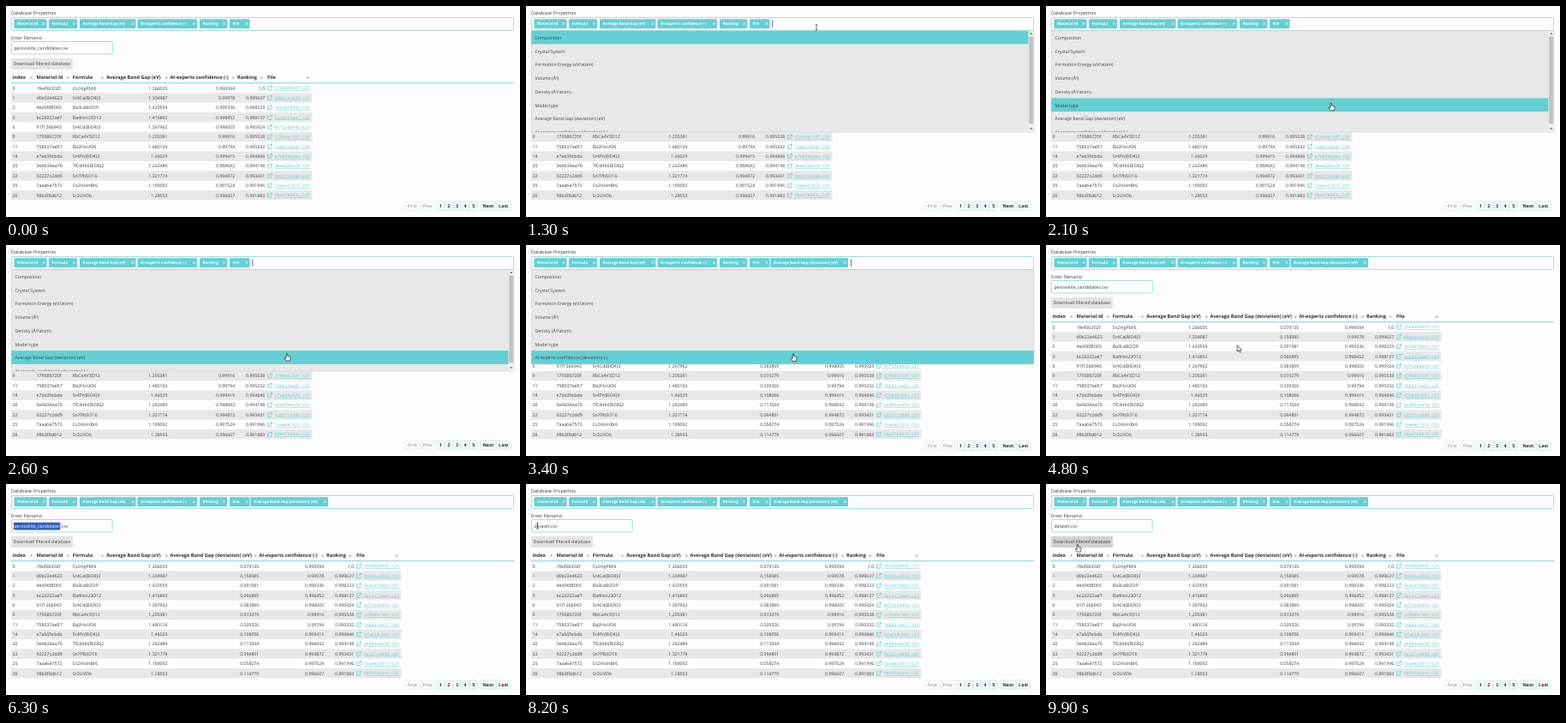
Write an HTML page with a canvas that moves like this. It is 600x246 px and loops after 10 s.

```html
<!DOCTYPE html>
<html lang="en">
<head>
<meta charset="utf-8">
<title>Candidate database</title>
<style>
html, body { margin: 0; width: 100%; height: 100%; overflow: hidden; background: #fefdfe; }
canvas { display: block; width: 600px; height: 246px; }
</style>
</head>
<body>
<canvas id="stage"></canvas>
<script>
const W = 600, H = 246, LOOP = 10000;
const PAPER = '#fefdfe', TEAL = '#62d0d4', EDGE = '#a5dde0', INK = '#404040', GRAY = '#e9e8e9';
const SANS = '"Open Sans", "Noto Sans", sans-serif';
const MONO = '"Liberation Mono", "DejaVu Sans Mono", monospace';

const canvas = document.getElementById('stage');
const ctx = canvas.getContext('2d');
const dpr = window.devicePixelRatio || 1;
canvas.width = W * dpr;
canvas.height = H * dpr;

// index, id, formula, gap, gap deviation, confidence, ranking
const rows = `0 1fe45b302f Cs2HgPbF6 1.266035 0.079135 0.999594 1.0
1 d0e22e4623 Sr4Ca(BiO4)3 1.334987 0.158985 0.99978 0.999637
2 4ed36f8003 Ba3LaBi2O9 1.420559 0.091081 0.999336 0.998223
3 bc2d222ae7 Ba4HoU3O12 1.416893 0.066895 0.998452 0.998137
6 91f126b943 Sr4Cd(BiO4)3 1.267962 0.083859 0.998005 0.995924
9 179586720f RbCa4V3O12 1.205381 0.073279 0.99916 0.995538
11 758537ee57 Ba2HoUO6 1.480124 0.039326 0.99794 0.995332
14 e7ab39cbda Sr4Pr(BiO4)3 1.46029 0.108056 0.999415 0.994846
20 0e4b34ea76 TlCd4In(BiO6)2 1.242489 0.113954 0.998692 0.994198
22 92227c2dd9 Sn7PbSO16 1.321774 0.094851 0.994872 0.993431
25 7aaa6e7572 Cs2HoInBr6 1.189092 0.058274 0.997524 0.991996
26 98b3f8d612 Sr2UVO6 1.28553 0.114779 0.996607 0.991883`
  .split('\n').map(line => line.split(' '));

const GAP = 'Average Band Gap (eV)', GAP_DEV = 'Average Band Gap (deviation) (eV)';
const CONF = 'AI-experts confidence (-)', CONF_DEV = 'AI-experts confidence (deviation) (-)';

// label, left, right
const chips = [
  ['Material Id', 9.5, 47.5], ['Formula', 50, 83], [GAP, 86, 151.5],
  [CONF, 153.5, 223], ['Ranking', 226, 258], ['File', 261, 284.5], [GAP_DEV, 285.5, 376]
];
const options = ['Composition', 'Crystal System', 'Formation Energy (eV/atom)', 'Volume (Å³)',
  'Density (Å³/atom)', 'Model type', GAP_DEV, CONF_DEV];

// Pointer hot spot: time, x, y
const path = [
  [300, 334, -12], [900, 339, 25], [1400, 339, 25], [2300, 332, 126], [2600, 328, 126.5],
  [3400, 312, 127], [4200, 294, 124], [4400, 292, 146], [5500, 63, 49], [5700, 63, 49],
  [6250, 9.5, 49], [7800, 9.5, 49], [8150, 13.5, 49], [8700, 13.5, 49], [9500, 37, 70.5]
];
const OPEN = 1200, PICK = 3400, CLOSE = 4400, DRAG = 5700, TYPE = 6900, KEY = 110;
const LIST_Y = 28.7, ITEM_H = 15.75, ROW_Y = 90, ROW_H = 11.36;

function rect(x, y, w, h, color) {
  ctx.fillStyle = color;
  ctx.fillRect(x, y, w, h);
}

function box(x, y, w, h, r, fill, stroke, line = 1) {
  ctx.beginPath();
  ctx.roundRect(x, y, w, h, r);
  if (fill) { ctx.fillStyle = fill; ctx.fill(); }
  if (stroke) { ctx.strokeStyle = stroke; ctx.lineWidth = line; ctx.stroke(); }
}

function text(s, x, mid, size = 5.25, color = INK, o = {}) {
  ctx.font = `${o.bold ? 'bold ' : ''}${size}px ${o.mono ? MONO : SANS}`;
  ctx.textAlign = o.align || 'left';
  ctx.fillStyle = color;
  ctx.fillText(s, x, mid + size * 0.36);
}

function width(s, size) {
  ctx.font = `${size}px ${SANS}`;
  return ctx.measureText(s).width;
}

function pointer(t) {
  if (t < path[0][0]) return { x: path[0][1], y: path[0][2] };
  for (let i = 1; i < path.length; i++) {
    const [t0, x0, y0] = path[i - 1], [t1, x1, y1] = path[i];
    if (t < t1) {
      const u = (t - t0) / (t1 - t0), e = u * u * (3 - 2 * u);
      return { x: x0 + (x1 - x0) * e, y: y0 + (y1 - y0) * e };
    }
  }
  const last = path[path.length - 1];
  return { x: last[1], y: last[2] };
}

const blink = (t, start) => t >= start && (t - start) % 1060 < 530;

function cross(x, y, r) {
  ctx.strokeStyle = '#fff';
  ctx.lineWidth = 0.8;
  ctx.beginPath();
  ctx.moveTo(x - r, y - r);
  ctx.lineTo(x + r, y + r);
  ctx.moveTo(x + r, y - r);
  ctx.lineTo(x - r, y + r);
  ctx.stroke();
}

function drawSelect(t) {
  text('Database Properties', 6, 8, 5.5);
  box(6.5, 13.5, 586, 15, 1, PAPER, EDGE);
  const shown = chips.slice(0, t < PICK ? 6 : 7);
  for (const [label, l, r] of shown) {
    box(l, 15.3, r - l, 11, 1, TEAL);
    text(label, l + 3.6, 20.7, 4.45, '#fff', { bold: true });
    cross(r - 3.5, 20.6, 1.2);
  }
  if (t < CLOSE && blink(t, OPEN)) rect(shown[shown.length - 1][2] + 3, 16.5, 0.7, 8.5, '#333');
}

function drawForm(t, p) {
  text('Enter filename', 6, 37, 5.3);
  box(6.5, 41.5, 117.7, 14.5, 1, PAPER, EDGE);
  const size = 5.25, left = 9.4, stem = 'perovskite_candidates', word = 'dataset';
  const typed = Math.floor((t - TYPE) / KEY) + 1;
  const name = t < TYPE ? stem : word.slice(0, typed);
  text(name + '.csv', left, 49, size);

  const end = left + width(name, size);
  if (t >= DRAG && t < TYPE) {
    const from = Math.max(left, Math.min(p.x, end));
    ctx.save();
    ctx.beginPath();
    ctx.rect(from, 44.6, end - from, 9.2);
    ctx.clip();
    rect(from, 44.6, end - from, 9.2, '#2f63c0');
    text(name, left, 49, size, '#fff');
    ctx.restore();
  }
  const typing = t >= TYPE && t < TYPE + KEY * word.length;
  if (t < 9400 && (typing || blink(t, TYPE + KEY * word.length))) rect(end, 45, 0.6, 8, '#333');

  const hover = p.x > 6 && p.x < 78 && p.y > 61 && p.y < 74;
  box(6, 61, 72, 13, 1.5, hover ? '#d0d0d0' : '#e4e3e4');
  text('Download filtered database', 8.5, 67.4, 5.2);
}

function sortArrow(x) {
  ctx.fillStyle = '#b5b5b5';
  ctx.beginPath();
  ctx.moveTo(x - 2, 84.6);
  ctx.lineTo(x, 82);
  ctx.lineTo(x + 2, 84.6);
  ctx.fill();
}

function linkIcon(x, y) {
  ctx.strokeStyle = TEAL;
  ctx.lineWidth = 0.8;
  ctx.beginPath();
  ctx.moveTo(x + 2.6, y - 1.8);
  ctx.lineTo(x + 0.5, y - 1.8);
  ctx.lineTo(x + 0.5, y + 2.5);
  ctx.lineTo(x + 4.6, y + 2.5);
  ctx.lineTo(x + 4.6, y + 0.6);
  ctx.moveTo(x + 2.2, y + 0.8);
  ctx.lineTo(x + 5.4, y - 2.4);
  ctx.moveTo(x + 3.4, y - 2.5);
  ctx.lineTo(x + 5.5, y - 2.5);
  ctx.lineTo(x + 5.5, y - 0.4);
  ctx.stroke();
}

function drawTable(wide) {
  const dx = wide ? 104 : 0;
  // title, left, arrow, field, right edge of numbers
  const cols = [
    ['index', 7.5, 29.5, 0], ['Material Id', 35.5, 72, 1], ['Formula', 77.7, 112.5, 2],
    [GAP, 117.2, 187.3, 3, 188.5]
  ];
  if (wide) cols.push([GAP_DEV, 191.5, 291, 4, 295.3]);
  cols.push([CONF, 191.4 + dx, 265.5 + dx, 5, 267.2 + dx], ['Ranking', 270 + dx, 298 + dx, 6, 302.2 + dx]);

  for (const [title, x, arrow] of cols) {
    text(title, x, 83.2, 5.65, '#333', { bold: true });
    sortArrow(arrow);
  }
  text('File', 305 + dx, 83.2, 5.65, '#333', { bold: true });
  sortArrow(352 + dx);
  rect(6, 89.4, 587, 0.9, TEAL);

  rows.forEach((row, i) => {
    const y = ROW_Y + i * ROW_H, mid = y + 5.7;
    if (i % 2) rect(6, y, 351.5 + dx, ROW_H, GRAY);
    for (const [, x, , field, right] of cols) {
      if (right) text(row[field], right, mid, 5.2, INK, { align: 'right' });
      else text(row[field], x, mid, 5.3);
    }
    linkIcon(305 + dx, mid);
    text(row[1] + '.CIF', 313.7 + dx, mid, 4.95, TEAL, { mono: true });
    rect(313.7 + dx, mid + 2.7, 41.6, 0.5, TEAL);
  });
}

function drawPager(y) {
  const button = (label, x, w, off) => {
    box(x, y - 5, w, 10, 1, PAPER, off ? '#d3eef0' : '#b4e4e6', 0.7);
    text(label, x + w / 2, y, 5.4, off ? '#808080' : '#2c2c2c', { bold: !off, align: 'center' });
  };
  button('First', 466, 17, true);
  button('Prev', 484.3, 15.5, true);
  for (let n = 1; n <= 5; n++) button(String(n), 493.6 + n * 9.6, 8.2);
  button('Next', 554.2, 17.5);
  button('Last', 573, 15.5);
}

function drawList(t, p) {
  const items = t < PICK ? options : options.filter(o => o !== GAP_DEV);
  const h = Math.min(118.3, items.length * ITEM_H);
  const hover = Math.max(0, Math.min(items.length - 1, Math.floor((p.y - LIST_Y) / ITEM_H)));
  ctx.save();
  ctx.beginPath();
  ctx.rect(6, LIST_Y, 587, h);
  ctx.clip();
  rect(6, LIST_Y, 587, h, GRAY);
  items.forEach((item, i) => {
    const y = LIST_Y + i * ITEM_H;
    if (i === hover) rect(6, y, 587, ITEM_H, TEAL);
    text(item, 10.5, y + 8.2, 5.2);
  });
  if (items.length * ITEM_H > h) {
    rect(586.5, LIST_Y, 6.5, h, '#f1f1f1');
    rect(587.2, 35.5, 5, 102, '#c1c1c1');
    ctx.fillStyle = '#666';
    for (const [y, d] of [[32, -1], [143.3, 1]]) {
      ctx.beginPath();
      ctx.moveTo(588, y - d);
      ctx.lineTo(591.4, y - d);
      ctx.lineTo(589.7, y + d);
      ctx.fill();
    }
  }
  ctx.restore();
  box(6.2, LIST_Y, 586.8, h, 0, null, '#c9c9c9', 0.5);
}

function poly(points, x, y) {
  ctx.beginPath();
  points.forEach(([a, b]) => ctx.lineTo(x + a, y + b));
  ctx.closePath();
  ctx.fillStyle = '#fff';
  ctx.strokeStyle = '#222';
  ctx.lineWidth = 0.7;
  ctx.lineJoin = 'round';
  ctx.fill();
  ctx.stroke();
}

const arrow = [[0, 0], [0, 7.5], [1.8, 5.9], [3, 8.4], [4.1, 7.9], [3, 5.5], [5.2, 5.3]];
const hand = [[-0.7, 0], [0.6, 0], [0.8, 2.8], [3.8, 3.6], [4.1, 5.4], [3.2, 8.6], [-0.7, 8.6],
  [-2.8, 5.6], [-2.2, 4.8], [-0.8, 5.6]];

function drawPointer(p, open) {
  const { x, y } = p;
  const field = (y > 13 && y < 28.5) || (y > 41 && y < 56 && x < 124);
  const link = (open && y >= 28.5 && y < 146) || (y > 61 && y < 74 && x < 78);
  if (link) poly(hand, x, y);
  else if (field) {
    rect(x - 0.3, y - 3.2, 0.7, 6.4, '#333');
    rect(x - 1.5, y - 3.4, 3, 0.6, '#333');
    rect(x - 1.5, y + 2.8, 3, 0.6, '#333');
  } else poly(arrow, x, y);
}

function draw(t) {
  const p = pointer(t), open = t >= OPEN && t < CLOSE;
  ctx.setTransform(dpr, 0, 0, dpr, 0, 0);
  ctx.textRendering = 'geometricPrecision';
  rect(0, 0, W, H, PAPER);
  drawSelect(t);
  drawForm(t, p);
  drawTable(t >= PICK);
  drawPager(t < PICK ? 233.2 : 233.9);
  if (open) drawList(t, p);
  drawPointer(p, open);
}

const start = performance.now();
function tick() {
  const t = (performance.now() - start) % LOOP;
  draw(Math.floor(t / 100) * 100);
  requestAnimationFrame(tick);
}
tick();
</script>
</body>
</html>
```
